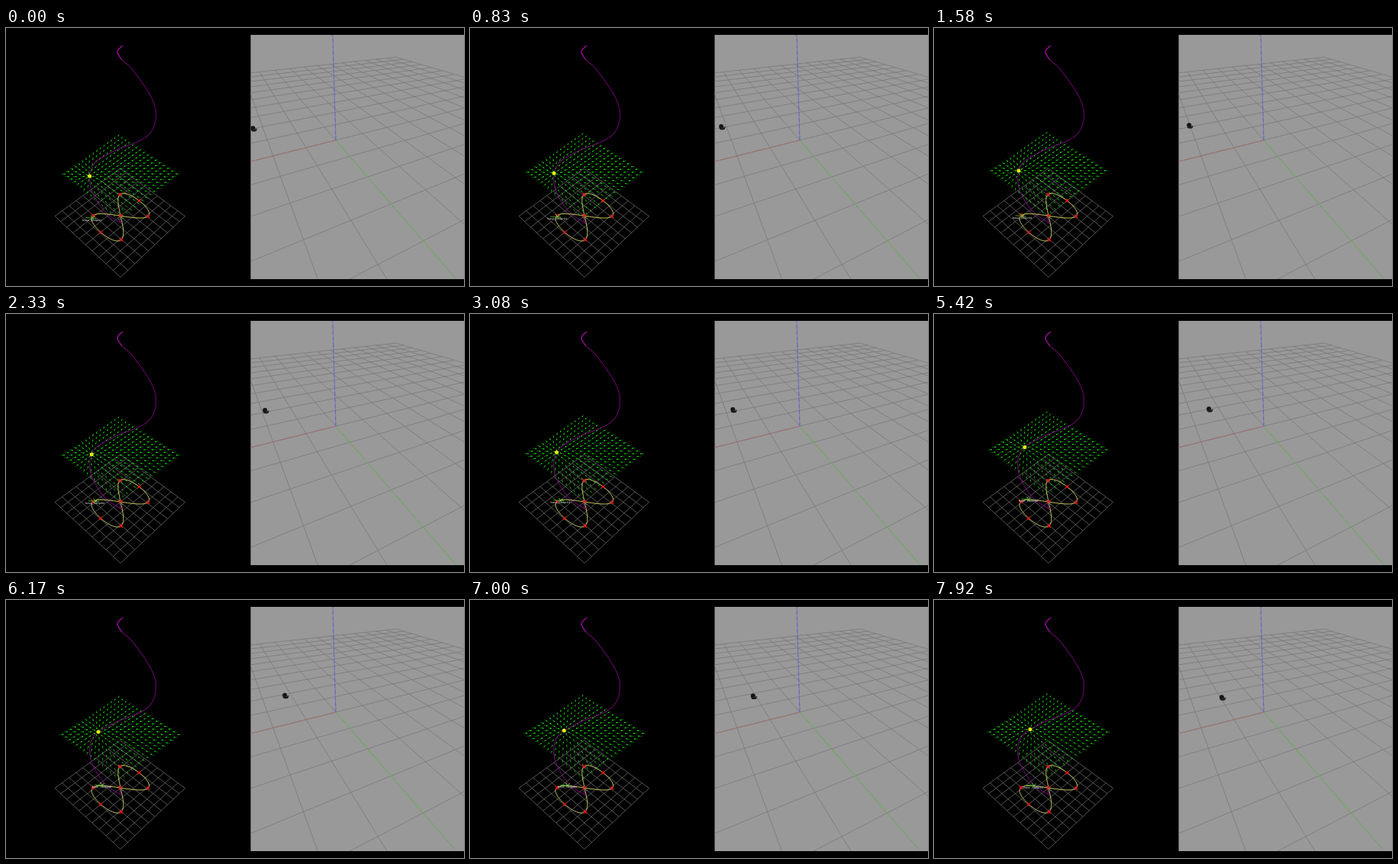
An HTML page with a canvas that plays this animation: 600x338 px, repeating every 8 s.

```html
<!DOCTYPE html>
<html lang="en">
<head>
<meta charset="utf-8">
<title>Vector field and robot</title>
<style>
  html, body { margin: 0; width: 100%; height: 100%; overflow: hidden; background: #000; }
  canvas { display: block; }
</style>
</head>
<body>
<canvas id="stage" width="600" height="338"></canvas>
<script>
const ctx = document.getElementById('stage').getContext('2d');
const LOOP = 8000, FPS = 12;

// Perspective map from the unit square to the quad a, b, c, d.
function perspective(a, b, c, d) {
  const sx = a[0] - b[0] + c[0] - d[0], sy = a[1] - b[1] + c[1] - d[1];
  const x1 = b[0] - c[0], y1 = b[1] - c[1], x2 = d[0] - c[0], y2 = d[1] - c[1];
  const det = x1 * y2 - x2 * y1;
  const g = (sx * y2 - x2 * sy) / det, h = (x1 * sy - sx * y1) / det;
  return (u, v) => {
    const w = g * u + h * v + 1;
    return [0, 1].map(k =>
      ((b[k] - a[k] + g * b[k]) * u + (d[k] - a[k] + h * d[k]) * v + a[k]) / w);
  };
}

function line(p, q, color, width = 1) {
  ctx.strokeStyle = color;
  ctx.lineWidth = width;
  ctx.beginPath();
  ctx.moveTo(...p);
  ctx.lineTo(...q);
  ctx.stroke();
}

function dashedLine(p, q, color, width, dash) {
  ctx.setLineDash(dash);
  line(p, q, color, width);
  ctx.setLineDash([]);
}

function strokePath(path, color, width, dash = []) {
  ctx.setLineDash(dash);
  ctx.strokeStyle = color;
  ctx.lineWidth = width;
  ctx.stroke(path);
  ctx.setLineDash([]);
}

function disc(x, y, rx, ry, color) {
  ctx.fillStyle = color;
  ctx.beginPath();
  ctx.ellipse(x, y, rx, ry, 0, 0, 2 * Math.PI);
  ctx.fill();
}

function spline(points) {
  const at = i => points[Math.max(0, Math.min(points.length - 1, i))];
  const path = new Path2D();
  path.moveTo(...points[0]);
  for (let i = 0; i < points.length - 1; i++) {
    const [p, a, b, q] = [at(i - 1), at(i), at(i + 1), at(i + 2)];
    path.bezierCurveTo(
      a[0] + (b[0] - p[0]) / 6, a[1] + (b[1] - p[1]) / 6,
      b[0] - (q[0] - a[0]) / 6, b[1] - (q[1] - a[1]) / 6, b[0], b[1]);
  }
  return path;
}

const trail = spline([[153, 23], [146, 31], [152, 42], [166, 55], [191, 92], [196, 120],
                      [183, 143], [140, 162], [114, 180], [111, 208], [128, 239], [153, 257]]);
const hook = spline([[153, 23], [146, 31], [152, 42]]);

const ground = perspective([149.5, 184], [234.5, 246.5], [150, 326.5], [64, 246.5]);

// Figure eight on the ground, one turn per 2π.
const eight = a => ground(0.5 + 0.215 * Math.sin(2 * a), 0.495 - 0.295 * Math.cos(a));

function drawGround() {
  for (let i = 0; i <= 10; i++) {
    line(ground(i / 10, 0), ground(i / 10, 1), '#808080', 0.65);
    line(ground(0, i / 10), ground(1, i / 10), '#808080', 0.65);
  }
}

function drawEight() {
  const path = new Path2D();
  for (let i = 0; i <= 80; i++) path.lineTo(...eight(i * Math.PI / 40));
  strokePath(path, '#cccc66', 0.95);
  for (let i = 0; i < 8; i++) {
    const [x, y] = eight(i * Math.PI / 4);
    line([x - 2, y - 2], [x + 2, y + 2], '#f01818', 1.3);
    line([x - 2, y + 2], [x + 2, y - 2], '#f01818', 1.3);
  }
  line([149, 247], [154, 250], '#26a04a');
  line([149, 248], [150, 254], '#a018a8');
}

// Each arrow points at the goal, foreshortened with the tilted plane.
function drawField(p, goalX, goalY) {
  const n = 16, cx = 150;
  const top = 139.2 - 17.7 * p, side = 191 - 22 * p + 4 * p * p;
  const half = 77.5 + 3 * p, drop = (side - top) * 1.22;
  const plane = perspective([cx - 1.5, top], [cx + half, side],
                            [cx, side + drop], [cx - half, side]);
  for (let i = 0; i < n; i++) {
    for (let j = 0; j < n; j++) {
      const u = i / (n - 1), v = j / (n - 1), near = (u + v) / 2;
      const [x, y] = plane(u, v);
      const dx = goalX - x, dy = goalY - y;
      const reach = Math.hypot(dx, dy * 1.35);
      if (reach < 2) continue;
      const k = Math.min(3.6 + 3.6 * near, reach) / reach;
      const tip = [x + dx * k, y + dy * k];
      const mid = [x + dx * k * 0.55, y + dy * k * 0.55];
      const fade = 1 - 0.5 * Math.max(0, near - 0.4) / 0.6;
      line([x, y], tip, `rgba(16,165,16,${0.85 * fade})`, 0.7);
      line(mid, tip, `rgba(36,215,28,${fade})`, 1.2);
    }
  }
}

function drawRobot(x, y) {
  line([x - 9, y - 1], [x + 5, y], '#35b52f', 0.9);
  line([x - 2, y - 4], [x + 2, y + 2], '#52e03a', 0.9);
  line([x, y], [x + 3, y - 3], '#d8d840', 0.9);
  ctx.fillStyle = '#e4e4e4';
  ctx.font = '4px "Liberation Sans", sans-serif';
  ctx.textAlign = 'center';
  ctx.fillText('base_footprint', x, y + 3);
}

// Floor grid given by its horizon and two vanishing points.
const HORIZON = -30.8, VANISH_X = 1143, VANISH_Y = 277.9;
const alongX = j => 4 - 0.5186 * j;
const alongY = k => 0.867 + 0.2522 * k;

function floorPoint(j, k) {
  const depth = (VANISH_X - VANISH_Y) / (alongX(j) + alongY(k));
  return [VANISH_Y + depth * alongY(k), HORIZON + depth];
}

function drawBody(x, y) {
  disc(x - 0.5, y - 0.8, 3, 3, '#161616');
  disc(x + 0.8, y + 2, 3.6, 1.7, '#1c1c1c');
  line([x + 1, y + 1], [x + 5, y + 0.3], '#303030', 1.4);
}

function drawScene(p) {
  const origin = [432, 147], greenEnd = [589.9, 329], blueEnd = [428, 9];
  ctx.save();
  ctx.beginPath();
  ctx.rect(320.5, 9, 279.5, 320);
  ctx.clip();
  ctx.fillStyle = '#999';
  ctx.fillRect(320, 9, 280, 320);
  for (let j = -10; j <= 7; j++) line(floorPoint(j, 10), floorPoint(j, -5), '#777', 0.75);
  for (let k = -5; k <= 10; k++) line(floorPoint(-10, k), floorPoint(7, k), '#777', 0.75);
  line(origin, [320, 175], '#a66d6d', 0.9);
  line(origin, greenEnd, '#85a57c', 0.9);
  dashedLine(origin, greenEnd, '#58b848', 1, [4, 2]);
  line(origin, blueEnd, '#7474c0', 0.9);
  dashedLine(origin, blueEnd, '#6262c4', 0.9, [5, 3]);
  drawBody(324 + 54 * p, 132 - 23.7 * p + 19.8 * p * p);
  ctx.restore();
}

// p runs from 0 to 1 over the loop.
function draw(p) {
  const goalX = 109.5 + 16.8 * p ** 1.5;
  const goalY = 194 - 38 * p + 13.5 * p * p;
  ctx.fillStyle = '#000';
  ctx.fillRect(0, 0, 600, 338);
  drawGround();
  drawField(p, goalX, goalY);
  strokePath(trail, '#4c0050', 0.8);
  strokePath(trail, '#980c9c', 1.1, [1.2, 1.5]);
  strokePath(hook, '#960a9a', 1.2);
  drawEight();
  drawRobot(113 + 11 * p + 6.5 * p * p, 243.2 + 6.3 * (1 - p / 0.8) ** 2);
  disc(goalX, goalY, 2.5, 2.5, '#e6ee10');
  drawScene(p);
}

function tick(now) {
  const steps = LOOP * FPS / 1000;
  const step = Math.floor((now % LOOP) * FPS / 1000 + 0.05) % steps;
  draw(step / steps);
  requestAnimationFrame(tick);
}
draw(0);
requestAnimationFrame(tick);
</script>
</body>
</html>
```
